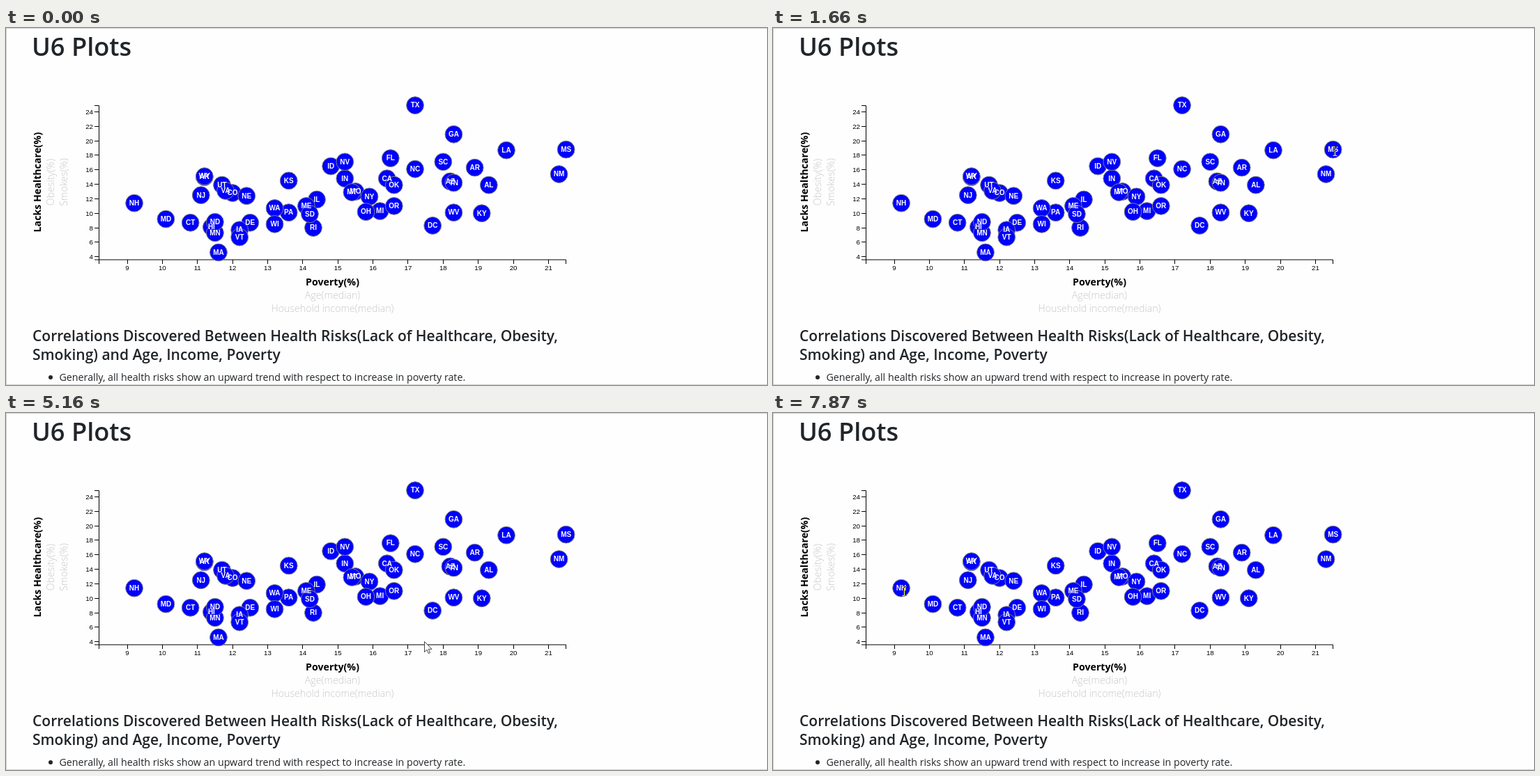
Recreate the animation shown at these times as an HTML page. Size 1092x513 px, loop 8 s.

```html
<!DOCTYPE html>
<html lang="en">
<head>
<meta charset="utf-8">
<title>Scatter plot</title>
<style>
  html, body { margin: 0; width: 100%; height: 100%; overflow: hidden; background: #fefefe; }
  svg { display: block; width: 100vw; height: 100vh; font-family: "Open Sans", "Noto Sans", sans-serif; }
  .heading { font-weight: 600; fill: #212529; }
  .body { font-size: 14.25px; fill: #212529; }
  .axis { font: 9.7px "Liberation Sans", Arial, sans-serif; fill: #000; }
  .lines { fill: none; stroke: #000; }
  .choice { font-size: 14.2px; text-anchor: middle; font-weight: 300; fill: #c8c8c8; }
  .choice.on { font-weight: 700; fill: #000; }
  .dots { fill: #00f; stroke: #808080; }
  .codes { font: bold 10px "Liberation Sans", Arial, sans-serif; fill: #fff; text-anchor: middle; }
  .tip { font-size: 10.5px; fill: #fff; text-anchor: middle; }
  #ibeam { mix-blend-mode: difference; fill: none; stroke: #fff; stroke-width: 1.2; }
</style>
</head>
<body>
<svg id="stage" viewBox="0 0 1092 513" xmlns="http://www.w3.org/2000/svg"></svg>
<script>
const LOOP = 8000;
const stage = document.getElementById('stage');

// code, poverty, lack of healthcare
const states = `AL 19.3 13.9,AK 11.2 15,AZ 18.2 14.4,AR 18.9 16.3,CA 16.4 14.8,CO 12 12.8,CT 10.8 8.7,
DE 12.5 8.7,DC 17.7 8.3,FL 16.5 17.6,GA 18.3 20.9,HI 11.4 8.1,ID 14.8 16.5,IL 14.4 11.9,IN 15.2 14.8,
IA 12.2 7.7,KS 13.6 14.5,KY 19.1 10,LA 19.8 18.7,ME 14.1 11,MD 10.1 9.2,MA 11.6 4.6,MI 16.2 10.3,
MN 11.5 7.3,MS 21.5 18.8,MO 15.5 13,MT 15.4 12.9,NE 12.4 12.4,NV 15.2 17.1,NH 9.2 11.4,NJ 11.1 12.5,
NM 21.3 15.4,NY 15.9 12.3,NC 17.2 16.1,ND 11.5 8.8,OH 15.8 10.2,OK 16.6 13.9,OR 16.6 11,PA 13.6 10.1,
RI 14.3 8,SC 18 17.1,SD 14.2 9.9,TN 18.3 14.2,TX 17.2 24.9,UT 11.7 13.9,VT 12.2 6.7,VA 11.8 13.1,
WA 13.2 10.7,WV 18.3 10.1,WI 13.2 8.5,WY 11.2 15.1`.split(',').map(row => {
  const [code, poverty, lack] = row.trim().split(' ');
  return { code, poverty: +poverty, lack: +lack };
});

const xOf = v => 174 + (v - 9) * 50.37;
const yOf = v => 328.7 - (v - 4) * 10.41;
const range = (from, to, step) => Array.from({ length: (to - from) / step + 1 }, (_, i) => from + i * step);
const text = (x, y, content, attrs = '') => `<text x="${x}" y="${y}" ${attrs}>${content}</text>`;
const each = (list, draw) => list.map(draw).join('');
const snap = v => Math.floor(v) + 0.5;

function axes() {
  const xs = range(9, 21, 1), ys = range(4, 24, 2);
  const ticks = each(xs, v => `M${snap(xOf(v))} 333v6`) + each(ys, v => `M133 ${snap(yOf(v))}h-6`);
  return `<path class="lines" d="M127 111.5H133.5V333M127 333H803.5V339M133.5 333V339${ticks}"/>
    <g class="axis">
      <g text-anchor="middle">${each(xs, v => text(xOf(v), 348, v))}</g>
      <g text-anchor="end">${each(ys, v => text(125, yOf(v) + 3.5, v))}</g>
    </g>`;
}

function axisChoices() {
  const bottom = ['Poverty(%)', 'Age(median)', 'Household income(median)'];
  const side = ['Lacks Healthcare(%)', 'Obesity(%)', 'Smokes(%)'];
  const style = i => `class="choice${i ? '' : ' on'}"`;
  return each(bottom, (label, i) => text(468.5, 370 + i * 19, label, style(i))) +
    `<g transform="rotate(-90)">${each(side, (label, i) => text(-221.5, 50 + i * 19, label, style(i)))}</g>`;
}

function tooltip(id, name, code) {
  const { poverty, lack } = states.find(s => s.code === code);
  return `<g id="${id}" class="tip" transform="translate(${Math.round(xOf(poverty) - 0.5)} ${Math.round(yOf(lack) - 105.5)})">
    <rect x="-46" width="92" height="93" rx="5" fill="#333"/>
    ${text(0, 18, name)}${text(0, 35, 'Poverty: ' + poverty)}${text(0, 83, 'Healthcare: ' + lack)}</g>`;
}

stage.innerHTML = `
  <rect width="1092" height="513" fill="#fefefe"/>
  <path d="M0 .5H1092M.5 0V513M0 512.5H1092" stroke="#d0d0d0"/>
  ${text(37, 40, 'U6 Plots', 'class="heading" font-size="36.2"')}
  ${axes()}
  <g class="dots">${each(states, s => `<circle cx="${xOf(s.poverty)}" cy="${yOf(s.lack)}" r="12.4"/>`)}</g>
  <g class="codes">${each(states, s => text(xOf(s.poverty), yOf(s.lack) + 3.3, s.code))}</g>
  ${axisChoices()}
  <g class="heading" font-size="21">
    ${text(38, 450, 'Correlations Discovered Between Health Risks(Lack of Healthcare, Obesity,')}
    ${text(38, 477, 'Smoking) and Age, Income, Poverty')}
  </g>
  <circle cx="64" cy="502" r="3" fill="#212529"/>
  ${text(76.5, 507, 'Generally, all health risks show an upward trend with respect to increase in poverty rate.', 'class="body"')}
  ${tooltip('tipRight', 'Mississippi', 'MS')}
  ${tooltip('tipLeft', 'New Hampshire', 'NH')}
  <path id="arrow" d="M.5 .5V15.5L4 12.2L6.4 17.5L8.6 16.5L6.3 11.3H11Z" fill="#fff" stroke="#333" stroke-width=".9"/>
  <path id="ibeam" d="M-3 -6.5H-1L0 -5.5L1 -6.5H3M0 -5.5V5.5M-3 6.5H-1L0 5.5L1 6.5H3"/>`;

// Each move runs in even steps; its keys are [step, x, y].
const moves = [
  { start: 440, end: 670, steps: 4, keys: [[0, 965, 497], [3, 812, 324]] },
  { start: 970, end: 1660, steps: 10, keys: [[0, 812, 318], [7, 805, 188], [8, 805, 183], [9, 806, 177]] },
  { start: 2520, end: 2750, steps: 4, keys: [[0, 806, 179], [1, 807, 181], [3, 807, 181]] },
  { start: 4540, end: 5160, steps: 9, keys: [[0, 807, 181], [8, 600, 328]] },
  { start: 5540, end: 5920, steps: 6, keys: [[0, 580, 332], [5, 346, 365]] },
  { start: 6230, end: 6690, steps: 7, keys: [[0, 338, 362], [6, 243, 325]] },
  { start: 7010, end: 7790, steps: 11, keys: [[0, 236, 322], [2, 210, 309], [6, 191, 261], [10, 188, 255]] },
  { start: 7870, end: 7871, steps: 2, keys: [[0, 188, 256], [1, 188, 256]] }
];

function pointerAt(t) {
  const move = moves.filter(m => t >= m.start).pop();
  if (!move) return null;
  const last = move.steps - 1;
  const step = Math.min(last, Math.floor((t - move.start) / (move.end - move.start) * last + 1e-6));
  const i = Math.max(1, move.keys.findIndex(key => key[0] >= step));
  const [s0, x0, y0] = move.keys[i - 1], [s1, x1, y1] = move.keys[i];
  const u = (step - s0) / (s1 - s0);
  return [Math.round(x0 + (x1 - x0) * u), Math.round(y0 + (y1 - y0) * u)];
}

const within = (t, ...spans) => spans.some(([from, to]) => t >= from && t < to);
const part = id => document.getElementById(id);
const [arrow, ibeam, tipRight, tipLeft] = ['arrow', 'ibeam', 'tipRight', 'tipLeft'].map(part);
const show = (node, on) => node.setAttribute('visibility', on ? 'visible' : 'hidden');

function render(t) {
  const pointer = pointerAt(t);
  const overText = within(t, [1660, 2590], [7870, LOOP]);
  show(arrow, pointer && !overText);
  show(ibeam, pointer && overText);
  if (pointer) {
    const [x, y] = pointer;
    arrow.setAttribute('transform', `translate(${x} ${y})`);
    ibeam.setAttribute('transform', `translate(${x + 0.5} ${y})`);
  }
  show(tipRight, within(t, [1585, 1660], [2590, 4615]));
  show(tipLeft, within(t, [7475, 7870]));
}

const begin = performance.now();
function tick() {
  render((performance.now() - begin) % LOOP);
  requestAnimationFrame(tick);
}
render(0);
requestAnimationFrame(tick);
</script>
</body>
</html>
```
